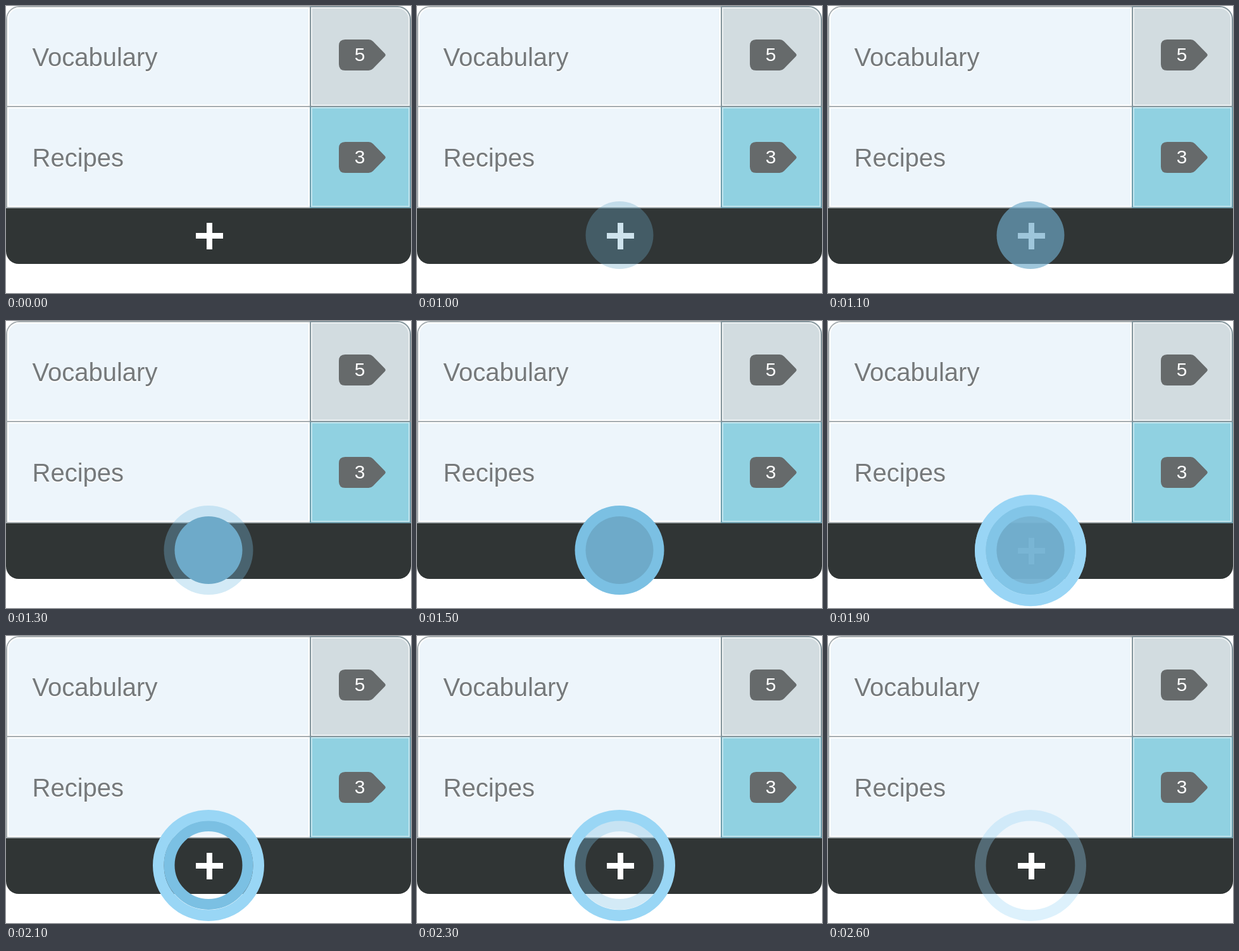
Recreate the animation shown at these times as an HTML page. Size 640x454 px, loop 2.7 s.

```html
<!DOCTYPE html>
<html lang="en">
<head>
<meta charset="utf-8">
<title>List with add button pulse</title>
<style>
  html, body { margin: 0; width: 100%; height: 100%; overflow: hidden; background: #fff; }
  svg { display: block; width: 640px; height: 454px; }
  text { font-family: "Liberation Sans", Helvetica, Arial, sans-serif; }
  .label { font-size: 40px; fill: #75797b; filter: drop-shadow(0 2px 0 #fff); }
  .count { font-size: 30px; fill: #fff; text-anchor: middle; }
  .cell { stroke-width: 2; }
  .light { fill: none; stroke: #fff; stroke-width: 2; }
  .inner { fill: #6eaac9; }
  .mid { fill: #7bc0e3; }
  .outer { fill: #99d6f5; }
  .ring { fill: none; }
  .pulse { opacity: 0; }
</style>
</head>
<body>
<svg viewBox="0 0 640 454">
  <defs>
    <path id="tag" fill="#666a6b" d="M536 0H573Q577 0 580 3L598.500 22Q601 24.500 598.500 27L580 46Q577 49 573 49H536Q526 49 526 39V10Q526 0 536 0Z"/>
  </defs>

  <g fill="#edf5fb" stroke="#a6adb0">
    <path class="cell" d="M1 159V21A20 20 0 0 1 21 1H481V159Z"/>
    <path class="cell" d="M1 159H481V319H1Z"/>
  </g>
  <path class="light" d="M3 157V21A18 18 0 0 1 21 3H479V157Z"/>
  <path class="light" d="M3 161H479V317H3Z"/>

  <path class="cell" fill="#d2dce0" stroke="#84959c" d="M481 159V1H619A20 20 0 0 1 639 21V159Z"/>
  <path class="light" stroke-opacity=".6" d="M483 157V3H619A18 18 0 0 1 637 21V157Z"/>
  <path class="cell" fill="#90d1e1" stroke="#6f9dab" d="M481 159H639V319H481Z"/>
  <path class="light" stroke-opacity=".45" d="M483 161H637V317H483Z"/>
  <path fill="none" stroke="#84959c" stroke-width="2" d="M480 159H640"/>

  <text class="label" x="41.500" y="95">Vocabulary</text>
  <text class="label" x="41.500" y="254">Recipes</text>
  <use href="#tag" y="53"/>
  <use href="#tag" y="215"/>
  <text class="count" x="559" y="87">5</text>
  <text class="count" x="559" y="249">3</text>

  <path fill="#303535" d="M0 320H640V388A20 20 0 0 1 620 408H20A20 20 0 0 1 0 388Z"/>
  <path fill="#fff" d="M317 343h9v16h17v9h-17v17h-9v-17h-17v-9h17z"/>

  <circle id="midRing" class="pulse ring" cx="320" cy="362.500" r="62" stroke="#7bc0e3" stroke-width="17"/>
  <circle id="outerRing" class="pulse ring" cx="320" cy="362.900" r="79.200" stroke="#99d6f5" stroke-width="17.600"/>
  <ellipse id="outerDisc" class="pulse outer" cx="320" cy="362.900" rx="88" ry="88.400"/>
  <circle id="midDisc" class="pulse mid" cx="320" cy="362.500" r="70.500"/>
  <circle id="innerDisc" class="pulse inner" cx="320" cy="362.500" r="53.500"/>
</svg>
<script>
  const LOOP = 2700, STEP = 100;
  const rise = [1 / 3, 2 / 3, 1], fall = [2 / 3, 1 / 3, 0];

  // Each entry: start time in ms, then opacity per step; the last value holds.
  const ramps = {
    innerDisc: [[1000, rise], [1900, fall]],
    midDisc: [[1300, rise], [1900, fall]],
    outerDisc: [[1600, rise], [1900, fall]],
    midRing: [[1900, [1]], [2200, fall]],
    outerRing: [[1900, [1]], [2500, fall.slice(0, 2)]]
  };

  for (const [id, parts] of Object.entries(ramps)) {
    const frames = [{ offset: 0, opacity: 0, easing: "step-end" }];
    for (const [start, values] of parts) {
      values.forEach((opacity, i) => frames.push({
        offset: (start + i * STEP) / LOOP, opacity, easing: "step-end"
      }));
    }
    frames.push({ offset: 1, opacity: 0 });
    document.getElementById(id).animate(frames, { duration: LOOP, iterations: Infinity });
  }
</script>
</body>
</html>
```
